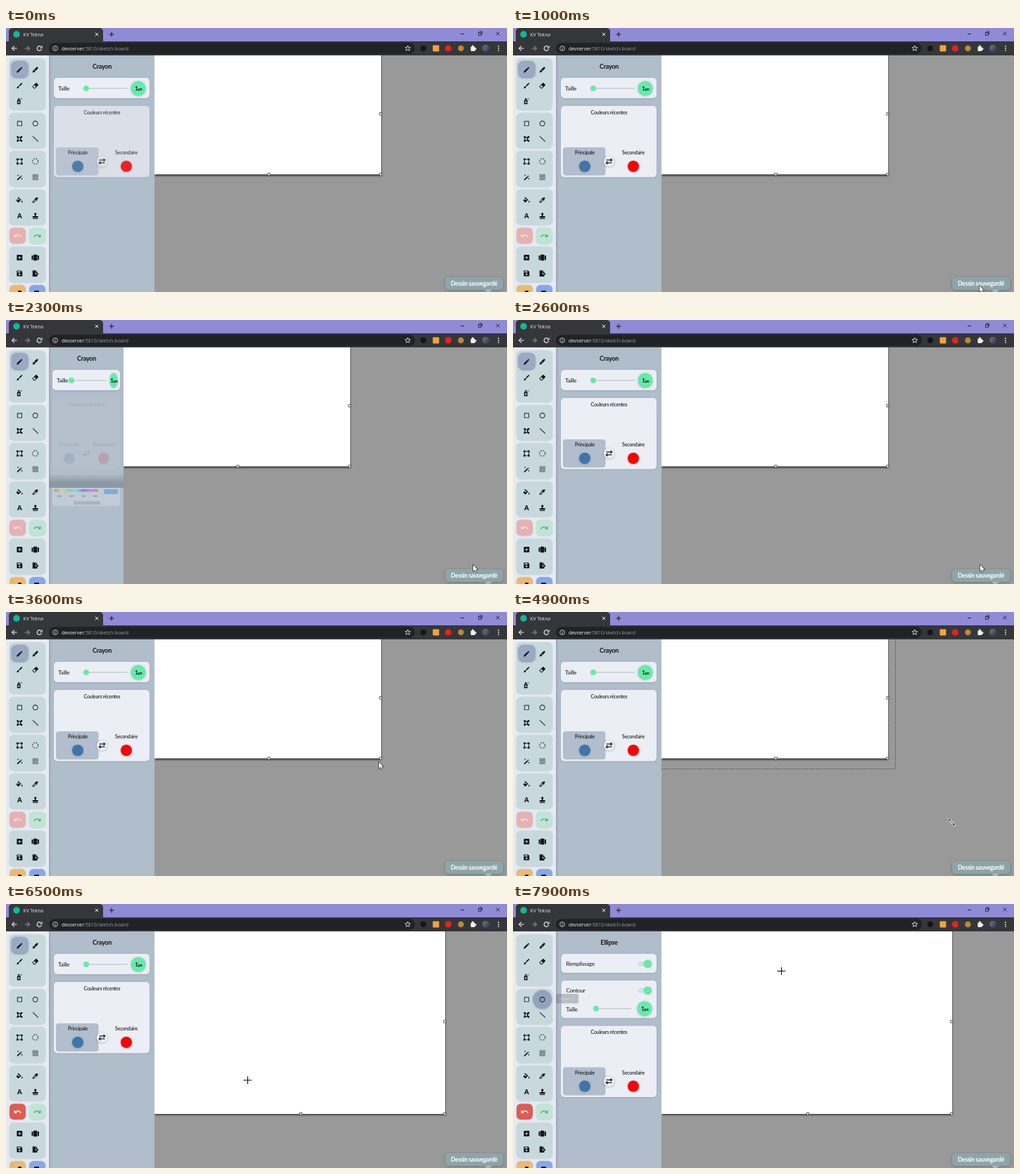
Write an HTML page with a canvas that moves like this. It is 712 px wide and 376 px high and loops after 8000 ms.

```html
<!DOCTYPE html>
<html lang="fr">
<head>
<meta charset="utf-8">
<title>KV Tekna</title>
<style>
html, body { margin: 0; width: 100%; height: 100%; overflow: hidden; background: #999; }
canvas { display: block; width: 712px; height: 376px; }
</style>
</head>
<body>
<canvas id="stage" width="712" height="376"></canvas>
<script>
const ctx = document.getElementById('stage').getContext('2d');
const LOOP = 8000, STEP = 100;
const INK = '#111418', CARD = '#ebeef4', GREEN = '#64eba9';

function box(x, y, w, h, r, fill) {
  ctx.beginPath();
  ctx.roundRect(x, y, w, h, r);
  ctx.fillStyle = fill;
  ctx.fill();
}
function oval(x, y, rx, fill, ry = rx) {
  ctx.beginPath();
  ctx.ellipse(x, y, Math.max(0, rx), ry, 0, 0, 7);
  ctx.fillStyle = fill;
  ctx.fill();
}
function line(points, color, width = 1) {
  ctx.beginPath();
  points.forEach(([x, y], i) => i ? ctx.lineTo(x, y) : ctx.moveTo(x, y));
  ctx.strokeStyle = color;
  ctx.lineWidth = width;
  ctx.stroke();
}
function label(s, x, y, size, { color = INK, weight = 400, align = 'left', font = 'Lato' } = {}) {
  ctx.font = `${weight} ${size}px ${font}, sans-serif`;
  ctx.letterSpacing = font === 'Lato' ? -size * 0.03 + 'px' : '0px';
  ctx.textAlign = align;
  ctx.textBaseline = 'alphabetic';
  ctx.fillStyle = color;
  ctx.fillText(s, x, y);
}
function shaded(blur, dy, color, draw) {
  ctx.save();
  ctx.shadowBlur = blur;
  ctx.shadowOffsetY = dy;
  ctx.shadowColor = color;
  draw();
  ctx.restore();
}
// Piecewise linear track: rows of [time, ...values]
function track(rows, t) {
  const i = rows.findIndex(r => r[0] > t);
  if (i === 0) return rows[0].slice(1);
  if (i < 0) return rows[rows.length - 1].slice(1);
  const a = rows[i - 1], b = rows[i], p = (t - a[0]) / (b[0] - a[0]);
  return a.slice(1).map((v, k) => v + (b[k + 1] - v) * p);
}

// Icons on a 24-unit grid
const ICONS = {
  pencil: 'M3 17.2V21h3.8L17.8 9.9 14 6.2zM20.7 7a1 1 0 0 0 0-1.4l-2.3-2.3a1 1 0 0 0-1.4 0l-1.9 1.8 3.8 3.8z',
  pen: 'M3 21l1-6 3-3 5 5-3 3zM8 11l9-8q3-1 4 2v2l-8 9z',
  brush: 'M7 14a3 3 0 0 0-3 3q0 2-2 2a5 5 0 0 0 4 2 4 4 0 0 0 4-4 3 3 0 0 0-3-3zM20.7 4.6l-1.3-1.3a1 1 0 0 0-1.4 0l-9 9 2.8 2.7 9-9a1 1 0 0 0-.1-1.4z',
  eraser: 'M16.2 3.6l5 5q1.2 1.4 0 2.8L12 20.5a4 4 0 0 1-5.7 0l-3.5-3.6q-1.2-1.4 0-2.8L13.4 3.6q1.4-1.2 2.8 0zM4.2 15.6l3.6 3.5q1.4 1.2 2.8 0l3.5-3.5-5-5z',
  spray: 'M4 10q0-2 2-2h7q2 0 2 2v12H4zM7 3h5v4H7zM14 4h2v2h-2zM18 2h2v2h-2zM18 6h2v2h-2zM7 13v5h5v-5z',
  rect: 'M4 4h16v16H4zM6 6v12h12V6z',
  circle: 'M12 3a9 9 0 1 0 .01 0zM12 5a7 7 0 1 1-.01 0z',
  poly: 'M3 3h5v2h8V3h5v5h-2l-3 4 3 4h2v5h-5v-2H8v2H3v-5h2V8H3zM8 8v8h7l-3-4 3-4z',
  line: 'M3 4.4L4.4 3 22 19.6 20.6 21z',
  select: 'M2 2h6v2h8V2h6v6h-2v8h2v6h-6v-2H8v2H2v-6h2V8H2zM8 6v2H6v8h2v2h8v-2h2V8h-2V6z',
  wand: 'M3 20L14 9l3 3L6 22zM15 8l2-2 3 3-2 2zM7 3l1 2 2 1-2 1-1 2-1-2-2-1 2-1zM19 14l1 2 2 1-2 1-1 2-1-2-2-1 2-1z',
  grid: 'M3 3h18v18H3zM5 5v3h3V5zM10 5v3h4V5zM16 5v3h3V5zM5 10v4h3v-4zM10 10v4h4v-4zM16 10v4h3v-4zM5 16v3h3v-3zM10 16v3h4v-3zM16 16v3h3v-3z',
  bucket: 'M7 2l10.5 9-7.500 8q-2 2-4 0l-4-4q-1-2 0-3L8 7 5 4zM9 8l-4 4h9zM20 13q4 6 0 7-4-1 0-7z',
  dropper: 'M20.700 5.600l-2.300-2.300q-1-1-2 0l-3 3-2-1.500-1.400 1.400 1.500 1.500L3 16.500V21h4.500l8.700-8.700 1.600 1.500 1.400-1.400-1.700-2 3.200-3q1-1 0-1.800zM7 19l-2-2 7-7 2 2z',
  letter: 'M10 4h4l6 16h-3.600l-1.300-4H8.900l-1.300 4H4zM12 7l-2 6h4z',
  stamp: 'M9 3h6q2 3-1 7v3h7v5H3v-5h7v-3Q7 6 9 3zM4 20h16v2H4z',
  add: 'M3 5q0-2 2-2h14q2 0 2 2v14q0 2-2 2H5q-2 0-2-2zM11 7v4H7v2h4v4h2v-4h4v-2h-4V7z',
  slides: 'M7 4h10v16H7zM2 6h4v12H2zM18 6h4v12h-4z',
  save: 'M3 3h14l4 4v14H3zM6 5v4h9V5zM12 12a3 3 0 1 0 .01 0z',
  export: 'M3 2h10l5 5v4h-6v5h6v6H3zM12 4v4h4zM14 12h4v-3l5 4.500-5 4.500v-3h-4z',
  undo: 'M12.500 8q-4 0-6.600 2.600L2 7v9h9l-3.600-3.600a8 8 0 0 1 12.700 3.600l2.400-.8A10.500 10.500 0 0 0 12.500 8z'
};
function icon(name, x, y, color = INK, size = 10.5, flip = 1) {
  ctx.save();
  ctx.translate(x, y);
  ctx.scale(flip * size / 24, size / 24);
  ctx.translate(-12, -12);
  ctx.fillStyle = color;
  ctx.fill(new Path2D(ICONS[name]), 'evenodd');
  ctx.restore();
}

function browser(t) {
  const loading = t >= 1500 && t < 2200;
  box(0, 0, 712, 20, 0, '#8f8bd7');
  box(4, 0, 134, 24, [5, 5, 0, 0], '#34363a');
  box(0, 19, 712, 20, 0, '#34363a');
  oval(15, 9, loading ? 2.5 : 4.7, '#12b89a');
  if (loading) {
    const a = t / 160;
    ctx.beginPath();
    ctx.arc(15, 9, 4.5, a, a + 4.6);
    ctx.strokeStyle = '#28c9ae';
    ctx.lineWidth = 1.2;
    ctx.stroke();
  }
  label('KV Tekna', 24.5, 11.8, 6.8, { color: '#e4e5e8', font: 'Open Sans' });
  const cross = (x, y, r, c, w) => {
    line([[x - r, y - r], [x + r, y + r]], c, w);
    line([[x + r, y - r], [x - r, y + r]], c, w);
  };
  cross(129, 9, 2.2, '#eee', 1);
  line([[146.500, 9], [153.500, 9]], '#222', 1.1);
  line([[150, 5.500], [150, 12.500]], '#222', 1.1);
  line([[646, 8.500], [651, 8.500]], '#27273a', 1);
  ctx.strokeStyle = '#27273a';
  ctx.lineWidth = 0.9;
  ctx.strokeRect(671.500, 6.500, 3.600, 3.800);
  line([[673, 6.500], [673, 5], [676.600, 5], [676.600, 9], [675, 9]], '#27273a', 0.9);
  cross(699, 8, 2.500, '#27273a', 0.9);

  for (const [x, d, c] of [[12, -1, '#e2e4e7'], [30, 1, '#898c91']]) {
    line([[x - 3.500 * d, 29], [x + 3.500 * d, 29]], c, 1.1);
    line([[x, 25.700], [x + 3.500 * d, 29], [x, 32.300]], c, 1.1);
  }
  if (loading) cross(47.500, 29, 3.200, '#eee', 1.3);
  else {
    ctx.beginPath();
    ctx.arc(47.500, 29, 3.200, 0.300, 5.500);
    ctx.strokeStyle = '#e2e4e7';
    ctx.lineWidth = 1.2;
    ctx.stroke();
    line([[51.200, 25.200], [51.200, 28.200], [48.300, 28.200]], '#e2e4e7', 1.1);
  }
  box(61, 21, 520, 16, 8, '#202226');
  ctx.beginPath();
  ctx.arc(70, 29, 3.400, 0, 7);
  ctx.strokeStyle = '#d4d6d9';
  ctx.lineWidth = 0.9;
  ctx.stroke();
  line([[70, 28.500], [70, 31]], '#d4d6d9', 0.9);
  line([[70, 26.800], [70, 27.700]], '#d4d6d9', 0.9);
  const opt = { font: 'Open Sans', color: '#f1f2f4' };
  label('devserver', 79, 31.600, 7, opt);
  const w = ctx.measureText('devserver').width;
  label(':5810/sketch-board', 79 + w, 31.600, 7, { ...opt, color: '#9a9da2' });
  ctx.beginPath();
  for (let i = 0; i < 10; i++) {
    const a = i * Math.PI / 5 - Math.PI / 2, r = i % 2 ? 1.800 : 4;
    ctx.lineTo(571 + r * Math.cos(a), 29 + r * Math.sin(a));
  }
  ctx.closePath();
  ctx.strokeStyle = '#dfe1e4';
  ctx.lineWidth = 0.9;
  ctx.stroke();
  oval(593, 29, 4.200, '#14161a');
  box(606.500, 24.500, 9, 9, 1, '#f2a23c');
  oval(628.500, 29, 4.700, '#e2231c');
  oval(646.500, 29, 4.200, '#b98a3b');
  box(660.500, 26.500, 6, 6.500, 1, '#f0f1f3');
  oval(663.300, 26, 1.500, '#f0f1f3');
  oval(667, 29.700, 1.500, '#f0f1f3');
  const g = ctx.createLinearGradient(677, 24, 687, 34);
  g.addColorStop(0, '#6f7690');
  g.addColorStop(1, '#33374b');
  oval(682, 29, 5, g);
  for (const y of [26, 29, 32]) oval(700, y, 0.900, '#e6e8ea');
}

function sidebar(t) {
  const ellipse = t >= 7700, active = t >= 5300;
  box(0, 39, 61, 337, 0, '#e6eaf1');
  const tile = (x, y, w, h, c, r = 6) => shaded(2, 0.500, 'rgba(80,100,120,.3)', () => box(x, y, w, h, r, c));
  for (const [y, h] of [[43.500, 73], [121, 50], [175, 51], [230, 50], [311.500, 50.500]]) tile(5, y, 51, h, '#c8d9de');
  tile(5, 284.500, 23, 22.500, active ? '#e05b53' : '#e4b2b3');
  tile(33, 284.500, 23, 22.500, '#c0e5d6');
  tile(5, 366, 23, 20, '#edb970');
  tile(33, 366, 23, 20, '#86a7eb');
  icon('undo', 16.500, 296, active ? '#fff' : '#f4dedf', 12);
  icon('undo', 44.500, 296, '#6f9d8c', 12, -1);

  const chosen = (x, y) => shaded(3, 0.500, 'rgba(50,60,100,.6)', () => box(x, y, 23.500, 23.500, 7, '#9ba9c3'));
  if (ellipse) shaded(3, 0.500, 'rgba(50,60,100,.6)', () => oval(41.700, 135.700, 13, '#94a2bd'));
  else {
    chosen(7.800, 47);
    if (t >= 7100) box(30, 124, 23.500, 23.500, 7, '#b3c3cf');
  }
  const L = 19.300, R = 41.700;
  const rows = [
    [59.500, 'pencil', 'pen'], [82, 'brush', 'eraser'], [104, 'spray'],
    [136, 'rect', 'circle'], [158, 'poly', 'line'],
    [190, 'select'], [212.500, 'wand', 'grid'],
    [245, 'bucket', 'dropper'], [267.500, 'letter', 'stamp'],
    [327, 'add', 'slides'], [349.500, 'save', 'export']
  ];
  for (const [y, a, b] of rows) {
    icon(a, L, y);
    if (b) icon(b, R, y, b === 'grid' ? '#59666c' : INK, b === 'slides' ? 12.500 : 10.500);
  }
  ctx.setLineDash([1.500, 1.700]);
  ctx.beginPath();
  ctx.arc(R, 190, 4, 0, 7);
  ctx.strokeStyle = INK;
  ctx.lineWidth = 1.100;
  ctx.stroke();
  ctx.setLineDash([]);
  box(17, 374, 5, 3, 1, INK);
  box(40, 374, 7, 3, 1, INK);
}

const card = (x, y, w, h) => shaded(2, 0.500, 'rgba(60,75,95,.3)', () => box(x, y, w, h, 5, CARD));

function slider(y, x0, x1, cx, rx) {
  line([[x0, y], [x1, y]], '#b4bdc6', 1);
  oval(x0, y, 4, GREEN);
  shaded(3, 0.500, 'rgba(60,80,90,.4)', () => oval(cx, y, rx, GREEN, 10.500));
  label('1', cx - 4.700, y + 2.900, 8, { weight: 700 });
  label('px', cx - 0.300, y + 2.900, 6, { weight: 700 });
}

function colors(y, mid, k, left, width, alpha) {
  ctx.save();
  ctx.globalAlpha = alpha;
  card(left, y, width, 101.500);
  const d = 34.500 * k, center = { align: 'center', weight: 500 };
  label('Couleurs récentes', mid, y + 11.700, 7, center);
  box(left + 3, y + 59, 60.500 * k, 40, 4, '#b2bdcd');
  label('Principale', mid - d, y + 69, 7, center);
  label('Secondaire', mid + d, y + 69, 7, center);
  shaded(3, 0.500, 'rgba(50,70,90,.4)', () => {
    oval(mid - d, y + 86, 8, '#3f75aa');
    oval(mid + d, y + 86, 8, '#f00');
    oval(mid, y + 79, 7.500, '#edf0f5');
  });
  for (const [s, yy] of [[1, y + 77], [-1, y + 81]]) {
    line([[mid - 4 * s, yy], [mid + 3.500 * s, yy]], INK, 1.200);
    line([[mid + 2 * s, yy - 2], [mid + 4.300 * s, yy], [mid + 2 * s, yy + 2]], INK, 1.100);
  }
  ctx.restore();
}

function picker(w, alpha) {
  ctx.save();
  ctx.globalAlpha = alpha;
  const band = ctx.createLinearGradient(0, 219, 0, 240);
  band.addColorStop(0, 'rgba(125,138,150,0)');
  band.addColorStop(0.600, 'rgba(125,138,150,.7)');
  band.addColorStop(1, 'rgba(125,138,150,.75)');
  box(61, 219, w, 20, 0, band);
  box(66, 239, w - 10, 26, [0, 0, 4, 4], 'rgba(220,228,235,.35)');
  const hue = ctx.createLinearGradient(69, 0, 131, 0);
  for (let i = 0; i <= 6; i++) hue.addColorStop(i / 6, `hsla(${i * 60},65%,65%,.75)`);
  box(69, 241, 62, 3.500, 1, hue);
  box(139, 241, 20, 7, 2, '#82abd6');
  for (let i = 0; i < 4; i++) box(73 + i * 17, 250, 6, 1.500, 0, '#8795a4');
  box(96, 258, 38, 5, 2, '#a8b4c0');
  ctx.restore();
}

function panel(t, w) {
  const k = w / 150, mid = 61 + w / 2 + 0.500, left = 61 + 7 * k, width = w - 14 * k, q = (150 - w) / 44;
  const fade = t < 1500 ? Math.min(1, 0.820 + t / 1000)
    : track([[2100, 1], [2200, 0], [2300, 0.120], [2400, 0.450], [2500, 0.820], [2600, 1]], t)[0];
  ctx.save();
  ctx.beginPath();
  ctx.rect(61, 39, w, 337);
  ctx.clip();
  box(61, 39, w, 337, 0, '#b0bdca');
  const edge = ctx.createLinearGradient(61, 0, 65, 0);
  edge.addColorStop(0, 'rgba(90,105,125,.25)');
  edge.addColorStop(1, 'rgba(90,105,125,0)');
  box(61, 39, 4, 337, 0, edge);
  const ellipse = t >= 7700;
  label(ellipse ? 'Ellipse' : 'Crayon', mid, 57.800, 9, { weight: 700, align: 'center' });
  if (ellipse) {
    card(68.500, 71, 135.500, 27);
    card(68.500, 109, 135.500, 53.500);
    label('Remplissage', 75.500, 88, 8);
    label('Contour', 75.500, 126, 8);
    label('Taille', 75.500, 152.500, 8);
    for (const y of [85, 123]) {
      box(177.500, y - 3.500, 15, 7, 3.500, '#d5dee4');
      shaded(2, 0.500, 'rgba(60,80,90,.4)', () => oval(191.500, y, 5.500, GREEN));
    }
    slider(149, 118, 168.500, 187, 10.500);
    colors(173.500, mid, 1, left, width, 1);
  } else {
    card(left, 71, width, 29);
    label('Taille', left + 6, 89, 8);
    slider(86, 114 - 21 * q, 173 - 30 * q, 188 - 35 * q, 10.500 - 5 * q);
    colors(111, mid, k, left, width, fade);
    if (t >= 2200 && t < 2500) picker(w, t < 2400 ? 1 : 0.400);
  }
  ctx.restore();
}

const PATH = [
  [700, 663, 380], [900, 663, 367], [2100, 663, 367], [2300, 664, 349], [2700, 664, 349],
  [3000, 616, 292], [3600, 530, 214], [3800, 532, 208], [4600, 532, 208],
  [4800, 543, 224], [4900, 623, 299], [6100, 623, 299], [6300, 375, 257],
  [6400, 375, 257], [6500, 343, 251], [6600, 145, 172], [6700, 145, 172],
  [7100, 41, 136], [7700, 41, 136], [7900, 381, 95.500]
];

function paper(t, w) {
  const big = t >= 5300, shift = w - 150;
  const right = (big ? 624 : 533) + shift, bottom = big ? 299 : 208.500, left = 214.500 + shift;
  box(0, 39, 712, 337, 0, '#999');
  ctx.save();
  ctx.beginPath();
  ctx.rect(0, 39, 712, 337);
  ctx.clip();
  shaded(3, 1, 'rgba(0,0,0,.9)', () => box(left - 4, 30, right - left + 4, bottom - 30, 0, '#fff'));
  if (t >= 4700 && t < 5300) {
    const [x, y] = track(PATH, t - 100);
    ctx.setLineDash([2, 1]);
    line([[211, Math.round(y) - 0.500], [Math.round(x) + 0.500, Math.round(y) - 0.500], [Math.round(x) + 0.500, 39]], '#555', 0.800);
    ctx.setLineDash([]);
  }
  const hx = right - 0.500, mx = (left + hx) / 2, my = (bottom + 36) / 2;
  for (const [x, y] of [[hx, my], [mx, bottom], [hx, bottom]]) {
    box(x - 2, y - 2, 4, 4, 0, '#333');
    box(x - 1.200, y - 1.200, 2.400, 2.400, 0, '#fff');
  }
  ctx.restore();
}

function toast() {
  shaded(4, 1, 'rgba(50,70,75,.45)', () => box(624, 355, 82.500, 18, 5, '#8da5aa'));
  ctx.fillStyle = '#a9bdc1';
  ctx.beginPath();
  ctx.moveTo(680, 373);
  ctx.lineTo(691, 373);
  ctx.lineTo(685.500, 377);
  ctx.fill();
  label('Dessin sauvegardé', 665, 367, 8.500, { color: '#fff', weight: 700, align: 'center' });
}

function tooltip(t) {
  if (t < 7300) return;
  ctx.save();
  ctx.globalAlpha = t < 7800 ? 0.850 : 0.400;
  box(61, 128, 32, 13.500, 2, '#6c747c');
  label('Ellipse - 2', 77, 137, 5.500, { color: '#fff', align: 'center' });
  ctx.restore();
}

function pointer(t) {
  if (t < 700) return;
  const [x, y] = track(PATH, t);
  ctx.save();
  ctx.translate(x, y);
  if (t >= 3800 && t < 6200) {
    for (const [c, w] of [['#fff', 2.600], ['#111', 1]]) {
      line([[-3.500, -3.500], [4, 4]], c, w);
      line([[-3.800, -0.800], [-3.800, -3.800], [-0.800, -3.800]], c, w);
      line([[1.300, 4.300], [4.300, 4.300], [4.300, 1.300]], c, w);
    }
  } else if ((t >= 6200 && t < 6600) || t >= 7800) {
    line([[-5.500, 0], [6, 0]], '#111', 1.100);
    line([[0.500, -5.500], [0.500, 5.500]], '#111', 1.100);
  } else {
    const arrow = new Path2D('M0 0V8.500L2 6.800 3.300 9.800 4.800 9.100 3.500 6.200H6.200Z');
    ctx.strokeStyle = '#222';
    ctx.lineWidth = 1.200;
    ctx.stroke(arrow);
    ctx.fillStyle = '#fff';
    ctx.fill(arrow);
  }
  ctx.restore();
}

function render(now) {
  const t = Math.floor((now % LOOP) / STEP) * STEP;
  const w = t < 2200 ? 150 : track([[2200, 80], [2300, 106], [2400, 138], [2500, 150]], t)[0];
  paper(t, w);
  panel(t, w);
  sidebar(t);
  toast();
  tooltip(t);
  browser(t);
  pointer(t);
}

const start = performance.now();
function tick() {
  render(performance.now() - start);
  requestAnimationFrame(tick);
}
tick();
</script>
</body>
</html>
```
